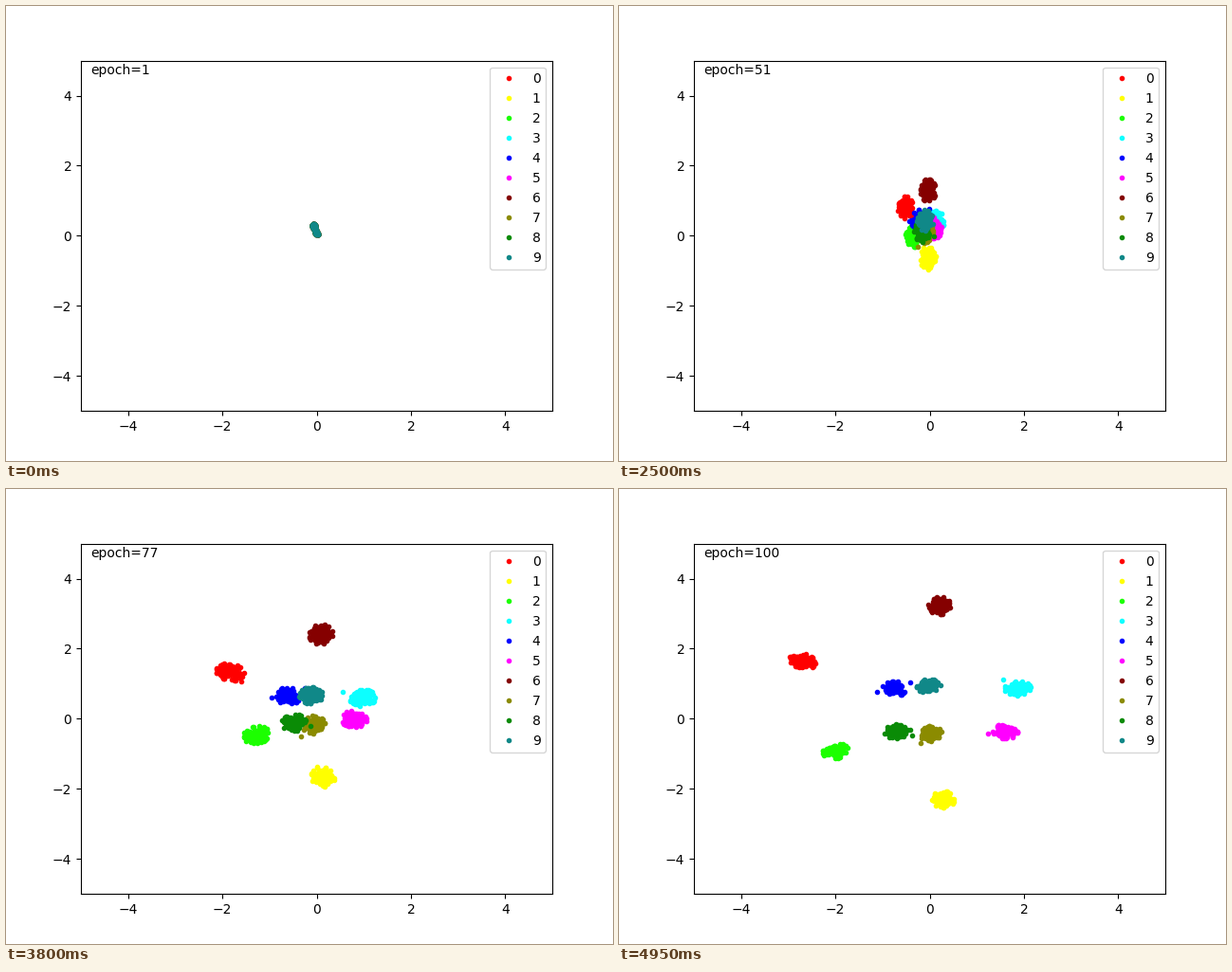
Animation, 640 px wide and 480 px high, one loop 5000 ms. Source, as a matplotlib script:

```python
import numpy as np
import matplotlib.pyplot as plt
from matplotlib.animation import FuncAnimation

EPOCHS = 100
POINTS = 120
COLORS = ["#ff0000", "#ffff00", "#1cff00", "#0cffff", "#0000ff",
          "#ff00ff", "#850000", "#8b8b00", "#0a8b06", "#108888"]

# All classes start at HUB, separate until SPLIT (MID) and then drift to END.
HUB = np.array([-.07, .30])
START, SPLIT = 29, 68
MID = np.array([(-1.45, 1.20), (.05, -1.37), (-.95, -.25), (.57, .48), (-.55, .55),
                (.42, .15), (.03, 2.06), (-.12, -.05), (-.38, 0), (-.17, .55)])
END = np.array([(-2.70, 1.65), (.29, -2.30), (-2.0, -.92), (1.86, .88), (-.75, .87),
                (1.60, -.37), (.20, 3.23), (.05, -.42), (-.72, -.36), (-.05, .95)])

SPREAD_KEYS = [1, 18, 35, 51, 68, 85]
SPREAD_X = [.013, .020, .022, .07, .12, .10]
SPREAD_Y = [.017, .040, .050, .13, .12, .085]

rng = np.random.default_rng(7)
base = rng.normal(size=(len(COLORS), POINTS, 2))
base = (base - base.mean(axis=1, keepdims=True)) / base.std(axis=1, keepdims=True)
tail = rng.random((POINTS, 1)) ** 3
reach = np.ones((POINTS, 1))
reach[:2] = 1.7  # a couple of stragglers in each class


def centers(epoch):
    if epoch < SPLIT:
        # Classes part vertically first, sideways later.
        t = max(0, (epoch - START) / (SPLIT - START))
        return HUB + (MID - HUB) * np.array([t ** 2, t])
    t = (epoch - SPLIT) / (EPOCHS - SPLIT)
    ease = (t * t * (3 - 2 * t) + np.sin(np.pi * t / 2)) / 2
    return MID + (END - MID) * ease


def cluster(k, center, epoch, noise):
    early = max(0, 1 - (epoch - 1) / 11)
    z = .9 * base[k] + .43 * noise
    z = early * base[-1] + (1 - early) * z
    radius = np.linalg.norm(z, axis=1, keepdims=True)
    z = reach * z / np.maximum(1, radius / 2.3)

    # Stretch each cloud along its way out from the hub.
    away = center - HUB
    length = np.linalg.norm(away) + 1e-9
    z = z + .1 * np.outer(z @ away, away / length)

    size = [np.interp(epoch, SPREAD_KEYS, s) for s in (SPREAD_X, SPREAD_Y)]
    return center + z * size + early * tail * [.09, -.28]


fig, ax = plt.subplots(figsize=(6.4, 4.8), dpi=100)
fig.subplots_adjust(left=79 / 640)
ax.set_xlim(-5, 5)
ax.set_ylim(-5, 5)
dots = [ax.plot([], [], ".", color=c, label=str(k))[0] for k, c in enumerate(COLORS)]
ax.legend(loc="upper right")
label = ax.text(-4.8, 4.6, "")


def update(frame):
    epoch = frame + 1
    noise = np.random.default_rng(epoch).normal(size=base.shape)
    for k, center in enumerate(centers(epoch)):
        dots[k].set_data(*cluster(k, center, epoch, noise[k]).T)
    label.set_text(f"epoch={epoch}")
    return dots + [label]


anim = FuncAnimation(fig, update, frames=EPOCHS, interval=50, repeat=True, repeat_delay=0)
plt.show()
```
